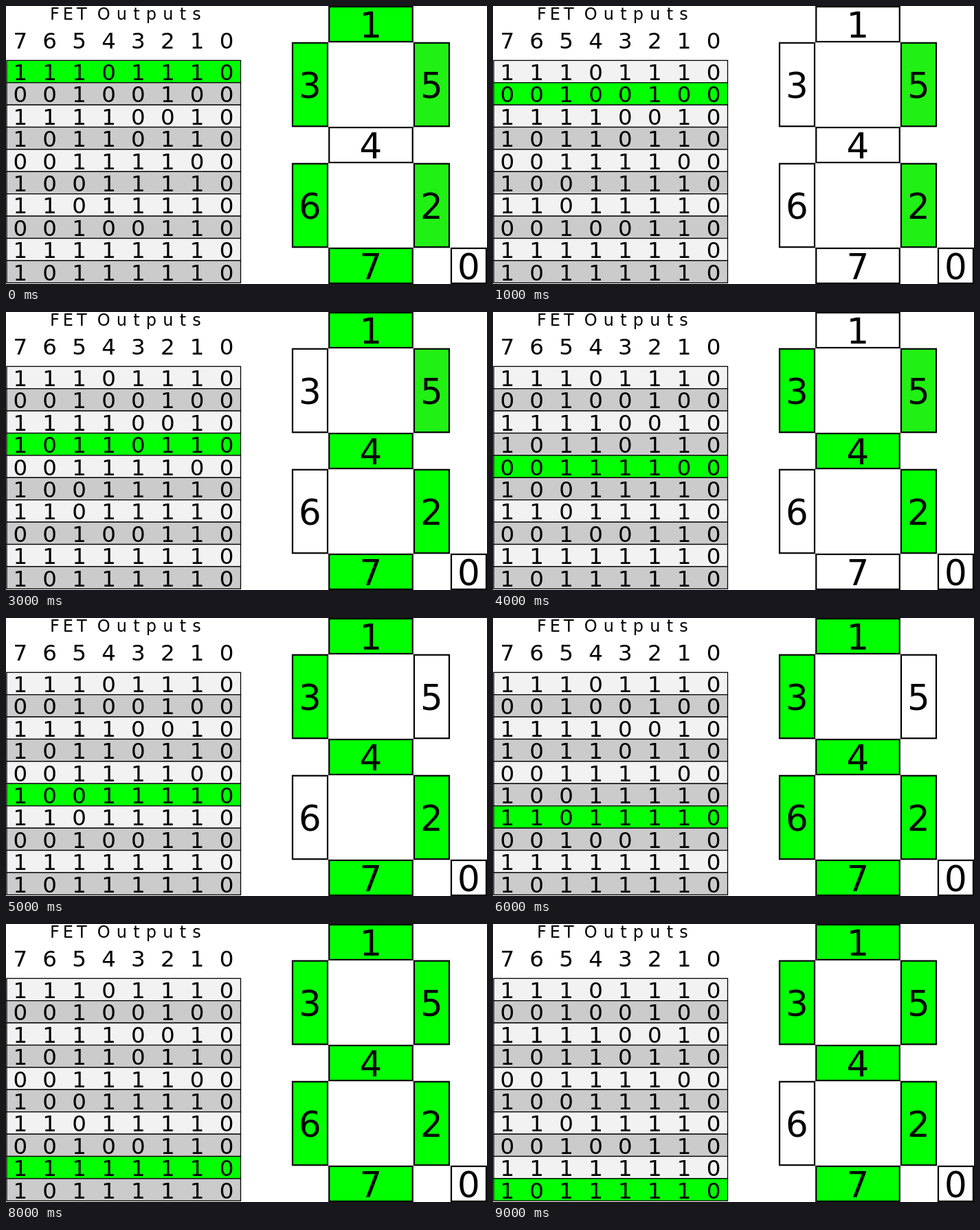
Recreate the animation shown at these times as an HTML page with a canvas. Size 700 by 405 pixels, loop 10 s.

```html
<!DOCTYPE html>
<html lang="en">
<head>
<meta charset="utf-8">
<title>Seven segment outputs</title>
<style>
  html, body { margin: 0; width: 100%; height: 100%; overflow: hidden; background: #fff; }
  canvas { display: block; }
</style>
</head>
<body>
<canvas id="stage" width="700" height="405"></canvas>
<script>
const ctx = document.getElementById('stage').getContext('2d');
const STEP = 1000;
const GREEN = '#00ff00', DULL = '#20f014';
const FONT = '"DejaVu Sans", Verdana, sans-serif';

// One row per digit 0-9; bits run from output 7 down to output 0.
const ROWS = [
  '11101110', '00100100', '11110010', '10110110', '00111100',
  '10011110', '11011110', '00100110', '11111110', '10111110'
];
const TABLE = { x: 1, y: 79.3, w: 340.5, row: 32.4 };

// Centre of each segment, indexed by output number.
const SEGMENTS = [
  [673.5, 378.5], [531, 26.5], [619.5, 290.5], [442.5, 114.5],
  [531, 202.5], [619.5, 114.5], [442.5, 290.5], [531, 378.5]
];
const SHORT = 51, LONG = 121.5;

function text(str, x, y, size, align = 'center', spacing = 0) {
  ctx.font = `${size}px ${FONT}`;
  ctx.textAlign = align;
  ctx.letterSpacing = `${spacing}px`;
  ctx.fillStyle = '#000';
  ctx.fillText(str, x, y);
}

function box(x, y, w, h, fill, line) {
  ctx.fillStyle = fill;
  ctx.fillRect(x, y, w, h);
  ctx.lineWidth = line;
  ctx.strokeRect(x, y, w, h);
}

function digits(str, y) {
  [...str].forEach((d, i) => text(d, 20.8 + i * 42.9, y, 32.5));
}

function drawTable(active) {
  text('FET', 64, 20, 24, 'left', 5);
  text('Outputs', 132.7, 20, 24, 'left', 9.2);
  digits('76543210', 62);
  ROWS.forEach((bits, i) => {
    const y = TABLE.y + i * TABLE.row;
    const fill = i === active ? GREEN : i % 2 ? '#cbcbcb' : '#f2f2f2';
    box(TABLE.x, y, TABLE.w, TABLE.row, fill, 1.3);
    digits(bits, y + 28.7);
  });
}

function litColor(n, active) {
  const dull = (n === 5 && active < 5) || (n === 2 && active < 2);
  return dull ? DULL : GREEN;
}

function drawSegments(active) {
  SEGMENTS.forEach(([cx, cy], n) => {
    const w = [1, 4, 7].includes(n) ? LONG : SHORT;
    const h = [2, 3, 5, 6].includes(n) ? LONG : SHORT;
    const lit = ROWS[active][7 - n] === '1';
    box(cx - w / 2, cy - h / 2, w, h, lit ? litColor(n, active) : '#fff', 2.2);
    text(n, cx, cy + 19, 51.5);
  });
}

function draw(time) {
  const active = Math.floor(time / STEP) % ROWS.length;
  ctx.fillStyle = '#fff';
  ctx.fillRect(0, 0, 700, 405);
  ctx.strokeStyle = '#000';
  drawTable(active);
  drawSegments(active);
}

const start = performance.now();
function tick() {
  draw(performance.now() - start);
  requestAnimationFrame(tick);
}
tick();
</script>
</body>
</html>
```
